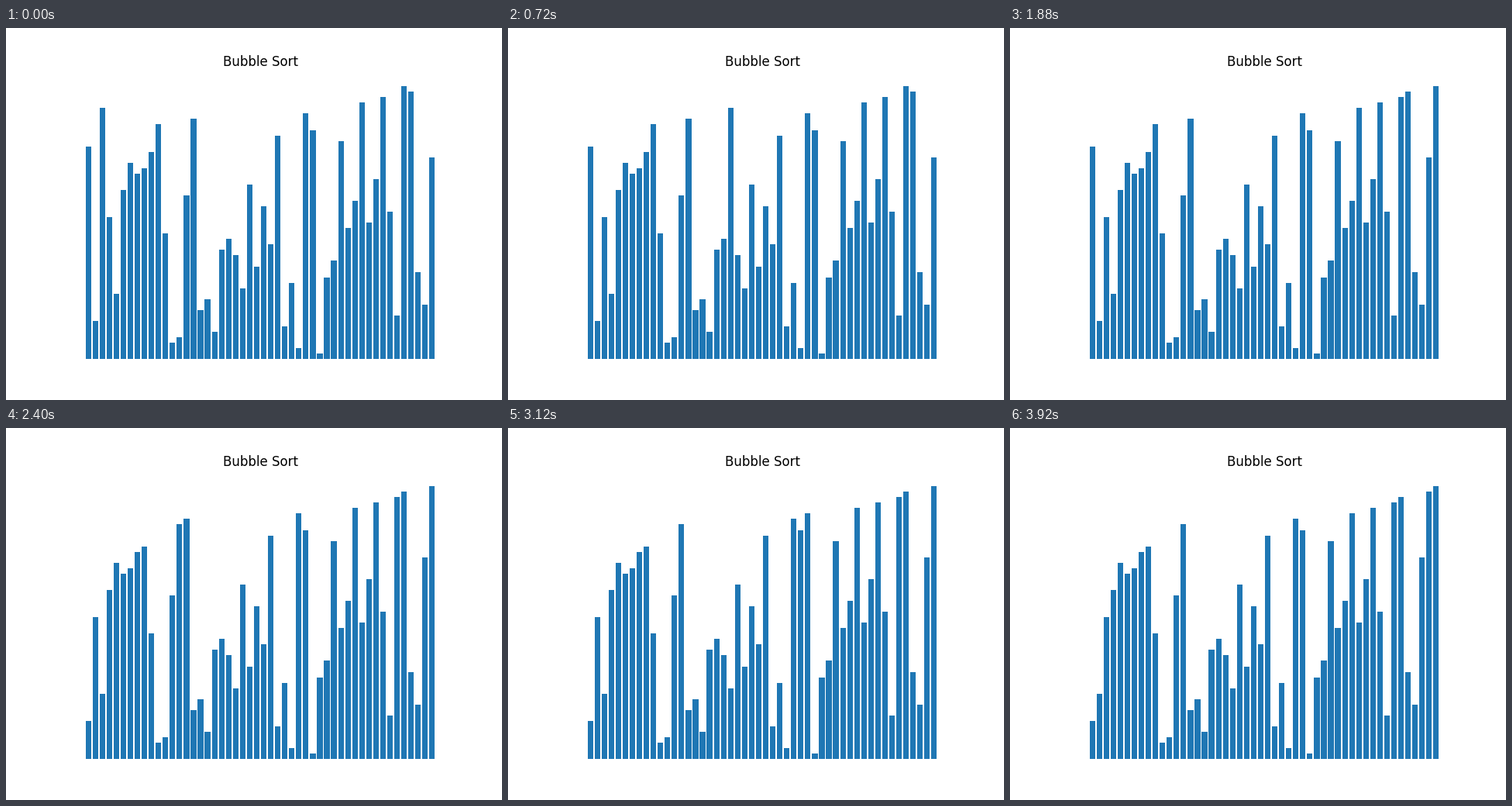
Animation of 640 by 480 pixels, one loop 4 s. Source, as a matplotlib script:

```python
import matplotlib.pyplot as plt
from matplotlib.animation import FuncAnimation

FRAMES = 100
INTERVAL = 40
SKIPPED = 1  # comparisons already done before the first frame's own

VALUES = [
    46, 39, 7, 26, 12, 31, 36, 34, 35, 38,
    43, 23, 3, 4, 30, 44, 9, 11, 5, 20,
    22, 19, 13, 32, 17, 28, 21, 41, 6, 14,
    2, 45, 42, 1, 15, 18, 40, 24, 29, 47,
    25, 33, 48, 27, 8, 50, 49, 16, 10, 37,
]


def sorted_up_to(steps):
    """Return the values after a number of bubble sort comparisons."""
    data = VALUES.copy()
    for step in range(steps):
        j = step % (len(data) - 1)
        if data[j] > data[j + 1]:
            data[j], data[j + 1] = data[j + 1], data[j]
    return data


plt.rcParams["font.family"] = "DejaVu Sans"
fig, ax = plt.subplots(figsize=(6.4, 4.8), dpi=100)
ax.set_title("Bubble Sort", fontsize=12)
ax.axis("off")
bars = ax.bar(range(len(VALUES)), VALUES, color="#1f77b4")


def update(frame):
    for bar, value in zip(bars, sorted_up_to(frame + SKIPPED + 1)):
        bar.set_height(value)
    return bars


anim = FuncAnimation(fig, update, frames=FRAMES, interval=INTERVAL, repeat=True)
plt.show()
```
